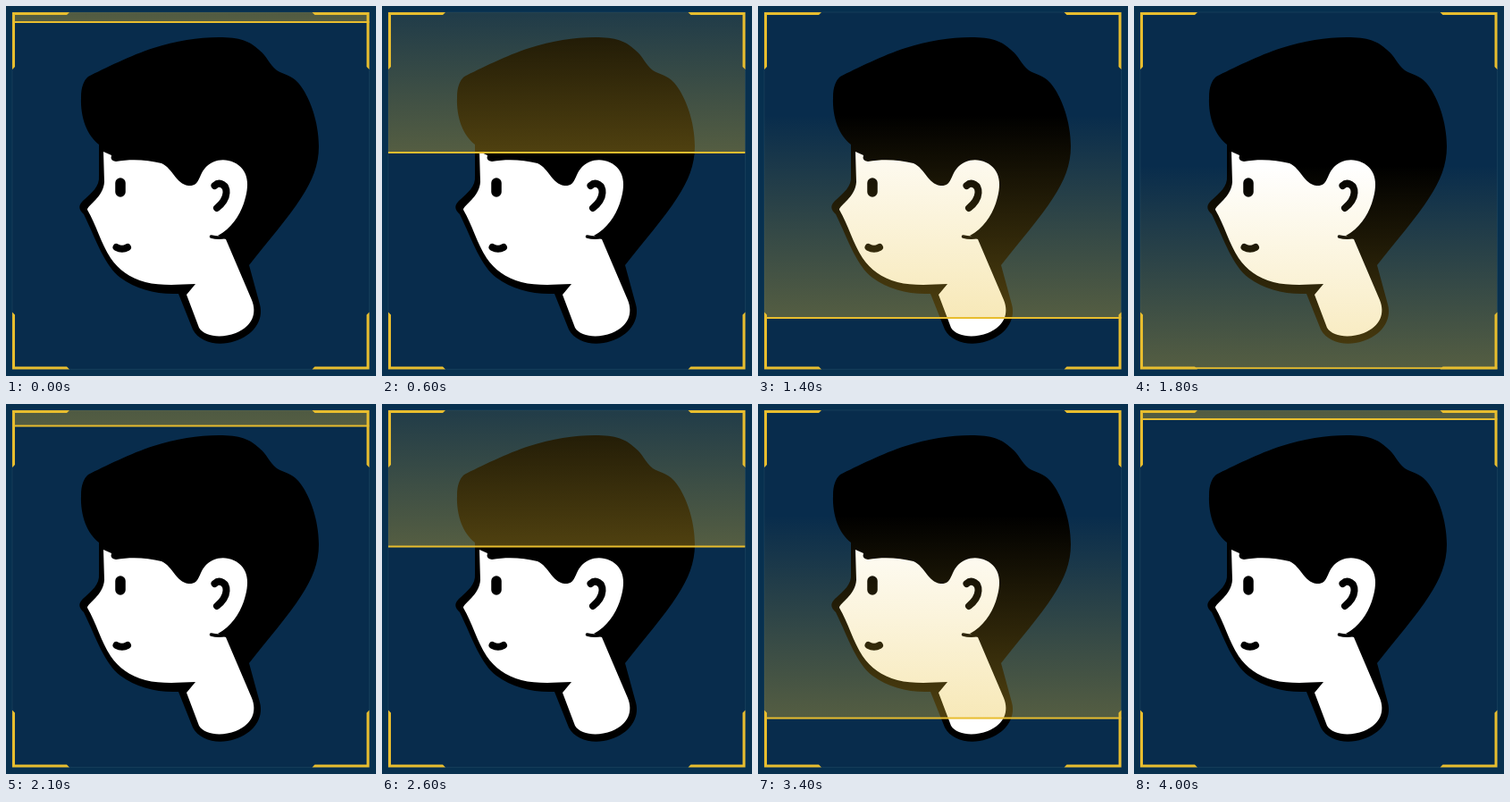
These frames come from a looping animation (414 by 414 pixels, 4.1 s). An HTML page with a canvas:

```html
<!DOCTYPE html>
<html lang="en">
<head>
<meta charset="utf-8">
<title>Face scan</title>
<style>
html, body { margin: 0; width: 100%; height: 100%; overflow: hidden; background: #07304f; }
canvas { display: block; width: 100vw; height: 100vh; }
</style>
</head>
<body>
<canvas id="stage" width="414" height="414"></canvas>
<script>
const ctx = document.getElementById('stage').getContext('2d');
const LOOP = 4100, STEP = 100;
const NEAR = 7, FAR = 406.5, SIZE = FAR - NEAR;
const GOLD = '232,189,46';
const BEAM = 227;

// Each sweep lists [time, line position].
const sweeps = [
  [[-160, 7], [0, 18], [100, 25.5], [600, 164], [1200, 287], [1400, 349], [1840, 406]],
  [[1840, 7], [2000, 17], [2100, 24.5], [2600, 159.5], [3200, 287], [3400, 351.5], [3840, 406]],
  [[3840, 7], [4000, 17], [4100, 25]]
];

const silhouette = new Path2D(`M92 79 C110 70 140 55 165 47 C190 39 215 35 238 35
  C262 35 272 39 283 49 C293 57 294 65 303 72 C311 77 319 77 327 86
  C340 101 350 130 350 157 C350 178 343 195 330 215 C316 237 293 263 272 290
  L284 334 C289 352 276 369 256 375 C238 381 217 377 209 362 L193 322
  C168 323 146 317 128 304 C110 290 102 264 87 233 C82 228 80 224 86 218
  C96 209 105 202 104 190 L104 155 C91 145 83 125 84 102 C84 91 87 83 92 79 Z`);

const skin = new Path2D(`M109 163 L118 167 Q116 173 123 174 C140 171 158 172 174 176
  C187 182 190 199 204 201 C217 202 215 190 223 181 C231 172 244 170 255 175
  C272 183 273 201 266 221 C261 235 252 249 237 257 L246 261 L275 329
  C281 344 276 358 257 366 C241 372 222 370 216 360 L202 323 L212 311
  C190 312 172 313 156 309 C138 304 126 295 117 282 C106 265 101 245 91 228
  C91 223 109 214 110 197 Z`);

const features = [
  [11.5, 'M128 198 V208'],
  [8, 'M123.5 270 Q130 273.5 136 270'],
  [8, 'M233.5 201 C239 196 247 200 246.5 209 C246 217 241 222 236 226'],
  [3.5, 'M229.5 258 Q237 260 246 258.5']
].map(([width, d]) => [width, new Path2D(d)]);

function hermite(points, t) {
  const slope = i => i > 0 && i < points.length - 1
    ? (points[i + 1][1] - points[i - 1][1]) / (points[i + 1][0] - points[i - 1][0])
    : 0;
  let i = 0;
  while (i < points.length - 2 && t >= points[i + 1][0]) i++;
  const [t0, y0] = points[i], [t1, y1] = points[i + 1];
  const span = t1 - t0, s = (t - t0) / span, r = 1 - s;
  return y0 * (1 + 2 * s) * r * r + y1 * s * s * (3 - 2 * s)
    + span * s * r * (slope(i) * r - slope(i + 1) * s);
}

function lineAt(t) {
  return hermite(sweeps.find(s => t < s[s.length - 1][0]), t);
}

function soften(radius, paint) {
  ctx.save();
  ctx.filter = `blur(${radius}px)`;
  paint();
  ctx.restore();
}

function drawHead() {
  ctx.fillStyle = '#000';
  ctx.fill(silhouette);
  ctx.fillStyle = '#fff';
  ctx.fill(skin);
  ctx.strokeStyle = '#000';
  ctx.lineCap = 'round';
  for (const [width, path] of features) {
    ctx.lineWidth = width;
    ctx.stroke(path);
  }
}

function drawBeam(y) {
  ctx.save();
  ctx.beginPath();
  ctx.rect(NEAR, NEAR, SIZE, SIZE);
  ctx.clip();
  const glow = ctx.createLinearGradient(0, y - BEAM, 0, y);
  glow.addColorStop(0, `rgba(${GOLD},0)`);
  glow.addColorStop(1, `rgba(${GOLD},0.34)`);
  ctx.fillStyle = glow;
  ctx.fillRect(NEAR, y - BEAM, SIZE, BEAM);
  soften(0.5, () => {
    ctx.fillStyle = `rgb(${GOLD})`;
    ctx.fillRect(NEAR, y - 1, SIZE, 2);
  });
  ctx.restore();
}

function drawCorners() {
  const arm = 64, w = 3;
  ctx.fillStyle = `rgb(${GOLD})`;
  for (const sx of [1, -1]) {
    for (const sy of [1, -1]) {
      ctx.save();
      ctx.translate(sx > 0 ? NEAR : FAR, sy > 0 ? NEAR : FAR);
      ctx.scale(sx, sy);
      ctx.beginPath();
      [[0, 0], [arm, 0], [arm - w, w], [w, w], [w, arm - w], [0, arm]]
        .forEach(([x, y]) => ctx.lineTo(x, y));
      ctx.fill();
      ctx.restore();
    }
  }
}

function draw(t) {
  ctx.fillStyle = '#07304f';
  ctx.fillRect(0, 0, 414, 414);
  ctx.fillStyle = '#082c4c';
  ctx.fillRect(NEAR, NEAR, SIZE, SIZE);
  ctx.strokeStyle = 'rgba(70,115,130,0.2)';
  ctx.lineWidth = 1;
  ctx.strokeRect(NEAR, NEAR, SIZE, SIZE);
  soften(0.7, drawHead);
  drawBeam(lineAt(t));
  soften(0.5, drawCorners);
}

const start = performance.now();
function tick() {
  const t = (performance.now() - start) % LOOP;
  draw(Math.floor(t / STEP) * STEP);
  requestAnimationFrame(tick);
}
tick();
</script>
</body>
</html>
```
